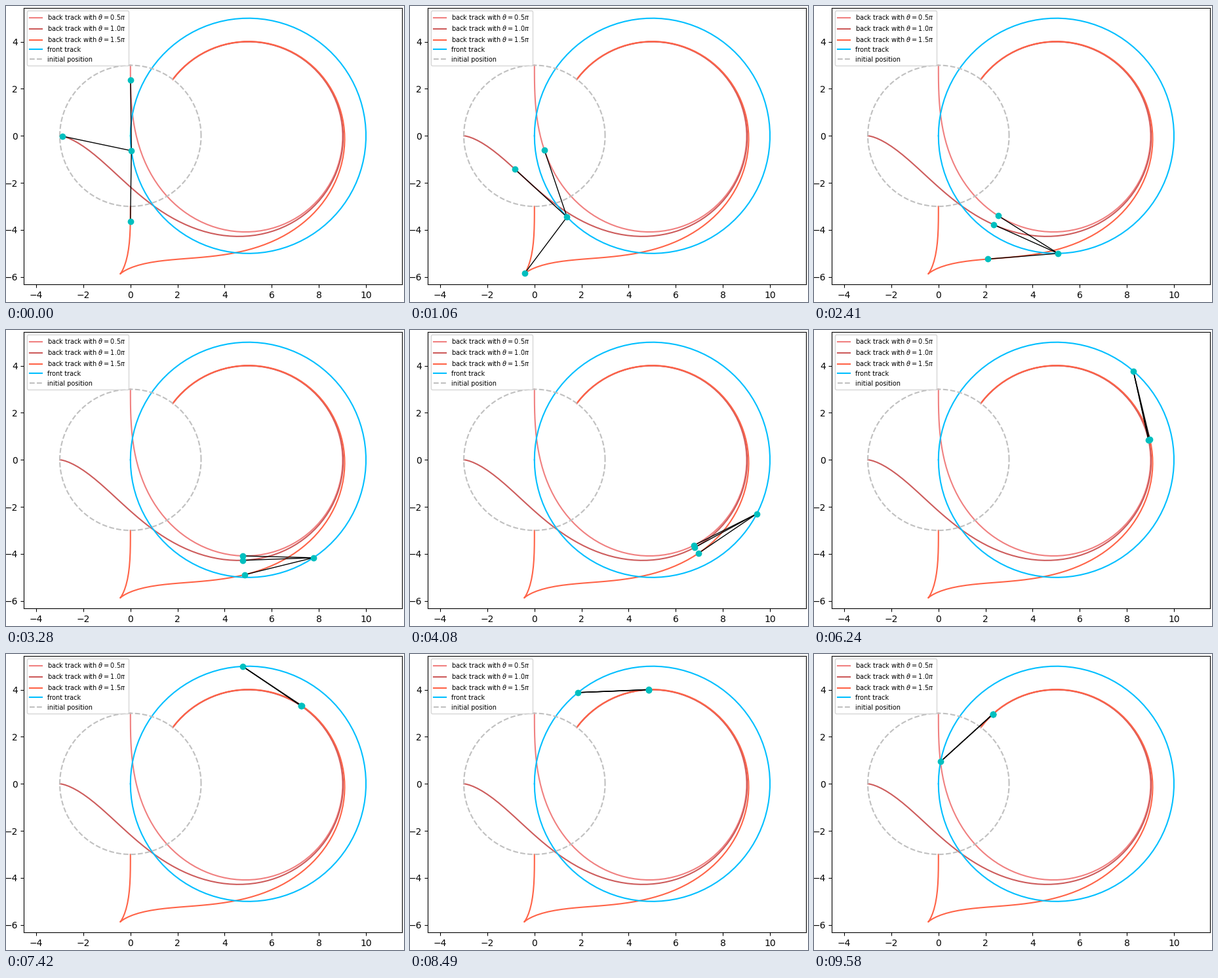
Recreate the animation shown at these times as a matplotlib script. Size 607 by 452 pixels, loop 9.68 s.

```python
import numpy as np
import matplotlib.pyplot as plt
from matplotlib.animation import FuncAnimation

W, H, DPI = 607, 452, 100
LOOP_MS, TICK_MS = 9680, 40
FRAMES = LOOP_MS // TICK_MS
RADIUS, ROD = 5, 3
UNIT = 35.92                        # pixels per data unit
X0, Y0 = 189.8, 198.25              # pixel position of (0, 0)
LEFT, TOP, RIGHT, BOTTOM = 27.3, 2.55, 604.15, 425.2

POINTS = 100                        # samples along each track
FIRST, SHOWN = 2.19, 95             # where playback starts, steps per loop

TRACKS = [(0.5, "lightcoral"), (1.0, "indianred"), (1.5, "tomato")]

turn = np.linspace(0, 2 * np.pi, POINTS)
front = np.column_stack([RADIUS - RADIUS * np.cos(turn), -RADIUS * np.sin(turn)])


def rod_angles(start, substeps=10):
    """Heading of the rod when the back wheel only rolls along it (RK4)."""
    def slope(a, phi):
        return RADIUS / ROD * np.cos(a - phi)

    h = (turn[1] - turn[0]) / substeps
    phi, angles = start, [start]
    for a0 in turn[:-1]:
        for i in range(substeps):
            a = a0 + i * h
            k1 = slope(a, phi)
            k2 = slope(a + h / 2, phi + h / 2 * k1)
            k3 = slope(a + h / 2, phi + h / 2 * k2)
            k4 = slope(a + h, phi + h * k3)
            phi += h / 6 * (k1 + 2 * k2 + 2 * k3 + k4)
        angles.append(phi)
    return np.array(angles)


def back_track(start):
    phi = rod_angles(start)
    return front + ROD * np.column_stack([np.cos(phi), np.sin(phi)])


fig = plt.figure(figsize=((W + 1e-6) / DPI, (H + 1e-6) / DPI), dpi=DPI)
ax = fig.add_axes([LEFT / W, 1 - BOTTOM / H, (RIGHT - LEFT) / W, (BOTTOM - TOP) / H])

backs = []
for share, color in TRACKS:
    back = back_track(share * np.pi)
    ax.plot(*back.T, color=color, label=rf"back track with $\theta={share}\pi$")
    backs.append(back)
ax.plot(*front.T, color="deepskyblue", label="front track")
ax.plot(ROD * np.cos(turn), ROD * np.sin(turn), "--", color="silver",
        label="initial position")

rods = [ax.plot([], [], "k-", lw=1, zorder=3)[0] for _ in backs]
wheels, = ax.plot([], [], "co", zorder=4)

ax.set_xlim((LEFT - X0) / UNIT, (RIGHT - X0) / UNIT)
ax.set_ylim((Y0 - BOTTOM) / UNIT, (Y0 - TOP) / UNIT)
ax.set_xticks(range(-4, 11, 2))
ax.set_yticks(range(-6, 5, 2))
ax.legend(loc="upper left", fontsize=7)


def update(n):
    k = int(FIRST + SHOWN * (n + 0.5) / FRAMES)
    for rod, back in zip(rods, backs):
        rod.set_data(*np.array([front[k], back[k]]).T)
    wheels.set_data(*np.array([front[k]] + [back[k] for back in backs]).T)
    return [*rods, wheels]


anim = FuncAnimation(fig, update, frames=FRAMES, interval=TICK_MS,
                     repeat=True, repeat_delay=0)
plt.show()
```
